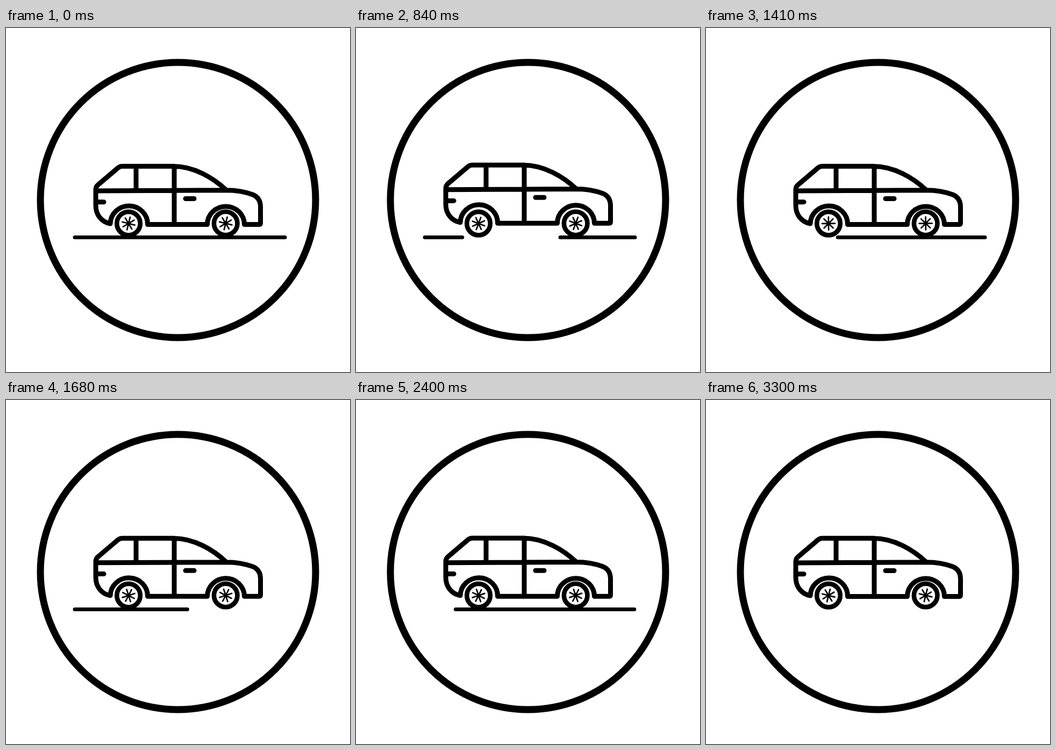
Write an HTML page with a canvas that moves like this. It is 640 by 640 pixels and loops after 3.33 s.

```html
<!DOCTYPE html>
<html lang="en">
<head>
<meta charset="utf-8">
<title>Car</title>
<style>
  html, body { margin: 0; width: 100%; height: 100%; overflow: hidden; background: #fff; }
  canvas { display: block; width: 640px; height: 640px; }
</style>
</head>
<body>
<canvas id="stage" width="640" height="640"></canvas>
<script>
const ctx = document.getElementById('stage').getContext('2d');
const STEP = 30, STEPS = 111, LAST = 110;
const CYCLES = 7, CYCLE = LAST / CYCLES;
const ROAD = { left: 128, right: 519, y: 389.5 };

// Keys are [time in steps, value]
const ROAD_START = [[8.9, 1], [17, 0.15], [19.85, 0.084], [22, 0]];
const ROAD_END = [[1.4, 1], [4, 0.734], [6.9, 0.734], [8.86, 0.535], [14, 0]];
const BOB = [[0, 0], [6.9, -2.5], [9.2, 0], [13, -2.5], [CYCLE, 0]];

const linear = x => x;
const smooth = x => (1 - Math.cos(Math.PI * x)) / 2;

const body = new Path2D(
  'M167 330V301Q167 295 171.500 291.500L208 260.500Q212 257.300 216 257.300H311' +
  'C350 257.300 386 279 410 301.800C432 302 448 306 459 310' +
  'Q473.500 316 473.500 333V363.500Q473.500 365.500 471.500 365.500H443.500' +
  'A34.500 33.500 0 0 0 374.500 365.500H263.500' +
  'A34.500 33.500 0 0 0 194 364C178 361 167 348 167 330Z' +
  'M167 303L410 301.800M242 257.300V302M313 257.300V365.500' +
  'M334 317.500H350M167 323.700H182'
);

function sample(keys, t, ease) {
  if (t <= keys[0][0]) return keys[0][1];
  for (let i = 1; i < keys.length; i++) {
    const [t0, a] = keys[i - 1], [t1, b] = keys[i];
    if (t <= t1) return a + (b - a) * ease((t - t0) / (t1 - t0));
  }
  return keys[keys.length - 1][1];
}

function circle(x, y, r, width) {
  ctx.lineWidth = width;
  ctx.beginPath();
  ctx.arc(x, y, r, 0, 2 * Math.PI);
  ctx.stroke();
}

function drawRoad(n) {
  const at = u => ROAD.left + u * (ROAD.right - ROAD.left);
  ctx.lineWidth = 7;
  for (let k = 0; k < CYCLES; k++) {
    const local = n - k * CYCLE;
    const start = k ? sample(ROAD_START, local + CYCLE, linear) : 0;
    const end = sample(ROAD_END, local, linear);
    if (end - start < 0.001) continue;
    ctx.beginPath();
    ctx.moveTo(at(start), ROAD.y);
    ctx.lineTo(at(end), ROAD.y);
    ctx.stroke();
  }
}

function drawWheel(x, y, angle) {
  circle(x, y, 21.8, 8.6);
  ctx.lineWidth = 2.7;
  ctx.beginPath();
  for (let i = 0; i < 8; i++) {
    const a = angle + i * Math.PI / 4;
    ctx.moveTo(x, y);
    ctx.lineTo(x + 12 * Math.sin(a), y - 12 * Math.cos(a));
  }
  ctx.stroke();
}

function draw(n) {
  ctx.fillStyle = '#fff';
  ctx.fillRect(0, 0, 640, 640);
  ctx.strokeStyle = '#000';
  ctx.lineCap = ctx.lineJoin = 'round';

  circle(320, 320, 256, 13);
  drawRoad(n);

  ctx.save();
  ctx.translate(0, sample(BOB, n % CYCLE, smooth));
  ctx.lineWidth = 9;
  ctx.stroke(body);
  ctx.restore();

  // Four full turns per loop
  const angle = 14 * Math.PI / 180 + 8 * Math.PI * n / LAST;
  drawWheel(228, 363.7, angle);
  drawWheel(408.7, 363.5, angle);
}

const began = performance.now();
function tick() {
  draw(Math.floor((performance.now() - began) / STEP) % STEPS);
  requestAnimationFrame(tick);
}
tick();
</script>
</body>
</html>
```
